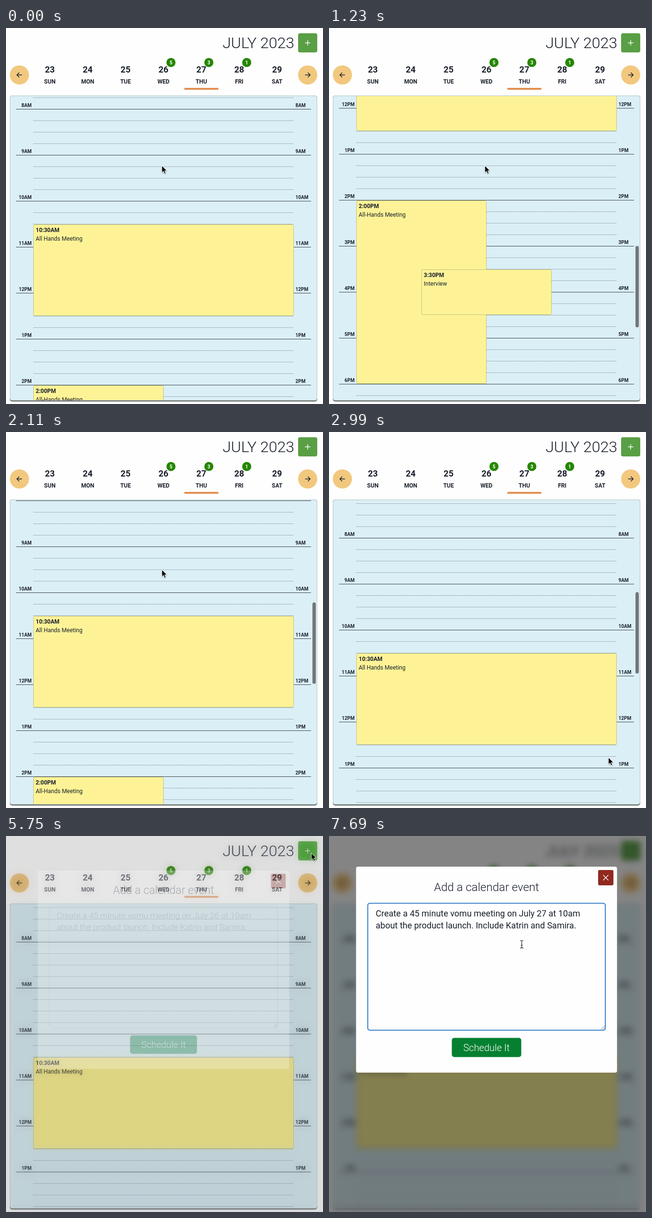
These frames come from a looping animation (662 px wide and 785 px high, 8000 ms). An HTML page:

```html
<!DOCTYPE html>
<html lang="en">
<head>
<meta charset="utf-8">
<title>Calendar</title>
<style>
  html, body { margin: 0; width: 100%; height: 100%; overflow: hidden; background: #fefefe; }
  svg, #shade { position: absolute; left: 0; top: 0; width: 662px; height: 785px; }
  #shade { background: rgba(0, 0, 0, .48); -webkit-backdrop-filter: blur(7px); backdrop-filter: blur(7px); }
  text { font-family: Roboto, Arial, sans-serif; fill: #1a202c; white-space: pre; }
  .bold { font-weight: 700; }
  .light { font-weight: 300; }
  .mid { text-anchor: middle; }
  .end { text-anchor: end; }
  .white { fill: #fff; }
  .icon { fill: none; stroke-width: 1.4; }
  #dialog { transform-origin: 329px 279px; }
</style>
</head>
<body>
<svg id="calendar" viewBox="0 0 662 785">
  <defs><clipPath id="view"><rect x="9" y="142" width="640" height="635" rx="4"/></clipPath></defs>
  <text class="light end" x="602" y="41.500" font-size="32">JULY 2023</text>
  <rect id="add" x="610" y="11" width="40" height="40" rx="4"/>
  <path class="icon" stroke="#fff" d="M630 25.5V36.5M624.5 31H635.5"/>
  <g id="week"></g>
  <rect x="372.500" y="125" width="71" height="4" fill="#e39052"/>
  <rect x="8" y="141" width="642" height="639" rx="5" fill="#777b7b"/>
  <rect x="8" y="141" width="642" height="636.500" rx="5" fill="#b0c6c6"/>
  <rect x="9" y="142" width="640" height="635" rx="4" fill="#dbeff6"/>
  <g clip-path="url(#view)">
    <g id="day"></g>
    <rect id="thumb" x="640" width="7" height="170" rx="3.500" fill="#737678"/>
  </g>
</svg>

<div id="shade"></div>

<svg viewBox="0 0 662 785">
  <g id="dialog">
    <rect x="56.500" y="64" width="545" height="430" rx="4" fill="#fefefe"/>
    <text class="light mid" x="329" y="114.500" font-size="24">Add a calendar event</text>
    <rect x="562" y="71" width="32" height="32" rx="3" fill="#90291f"/>
    <path class="icon" stroke="#fff" d="M572.500 81.500L583.500 92.500M583.500 81.500L572.500 92.500"/>
    <rect x="81.500" y="140.500" width="495" height="264.500" rx="5" fill="none" stroke="#cbd5e0"/>
    <rect id="ring" x="81" y="140.500" width="496" height="265" rx="4" fill="none" stroke="#3a82cb" stroke-width="2"/>
    <path d="M568 403.500L575.500 396M572 403.500L575.500 400" stroke="#666" stroke-width=".9"/>
    <g id="hint" class="light"></g>
    <g id="entry"></g>
    <rect id="caret" width="1" height="21" fill="#1a202c"/>
    <rect x="256.500" y="421.500" width="145" height="40" rx="5" fill="#058031"/>
    <text class="light mid white" x="329" y="448.500" font-size="20">Schedule It</text>
  </g>
  <g id="pointer">
    <path id="arrow" d="M.5 .5V15L3.900 11.900L6.300 17.300L8.800 16.200L6.500 11H11.100Z" fill="#000" stroke="#fff" stroke-width="1"
      style="filter: drop-shadow(0 1px 1px rgba(0,0,0,.35))"/>
    <path id="beam" class="icon" stroke="#222" style="stroke-width:1.200" d="M-3 -8Q0.500 -8 .5 -6Q.5 -8 4 -8M.5 -6V6M-3 8Q.5 8 .5 6Q.5 8 4 8M-1.500 2H2.500"/>
  </g>
</svg>

<script>
const $ = id => document.getElementById(id);
const LOOP = 8000, HOUR = 96, EIGHT = 169;

function add(parent, tag, attrs, content = '') {
  const el = document.createElementNS('http://www.w3.org/2000/svg', tag);
  for (const key in attrs) el.setAttribute(key, attrs[key]);
  el.textContent = content;
  parent.append(el);
  return el;
}
const label = (parent, x, y, size, cls, content) =>
  add(parent, 'text', { x, y, 'font-size': size, class: cls }, content);
const hourY = hour => EIGHT + (hour - 8) * HOUR;

function buildWeek() {
  const week = $('week');
  const badges = { WED: 5, THU: 3, FRI: 1 };
  'SUN MON TUE WED THU FRI SAT'.split(' ').forEach((name, i) => {
    const x = 91.5 + i * 79.1;
    label(week, x, 93.3, 18, 'bold mid', 23 + i);
    label(week, x, 116.2, 12, 'bold mid', name);
    if (!badges[name]) return;
    add(week, 'circle', { cx: x + 15.7, cy: 72, r: 9.5, fill: '#258600' });
    label(week, x + 15.7, 75.6, 10, 'bold mid white', badges[name]);
  });
  for (const [x, dir] of [[28, -1], [630, 1]]) {
    add(week, 'circle', { cx: x, cy: 98, r: 20, fill: '#f2c87f' });
    add(week, 'path', { class: 'icon', stroke: '#1a202c',
      d: `M${x - 5.3 * dir} 98H${x + 5 * dir}M${x + .3 * dir} 93L${x + 5.3 * dir} 98L${x + .3 * dir} 103` });
  }
}

function buildDay() {
  const day = $('day');
  for (let hour = 0; hour < 24; hour += .25) {
    const y = hourY(hour);
    if (hour % 1) {
      add(day, 'path', { d: `M57 ${y + .5}H601`, stroke: '#6f7a80', 'stroke-dasharray': '1 1' });
      continue;
    }
    const name = (hour % 12 || 12) + (hour < 12 ? 'AM' : 'PM');
    add(day, 'path', { d: `M21 ${y + .5}H637`, stroke: '#3d444b' });
    label(day, 53.5, y - 4.5, 10, 'bold end', name);
    label(day, 604.5, y - 4.5, 10, 'bold', name);
  }
}

function addEvent(start, hours, x, width, time, title) {
  const day = $('day'), y = hourY(start) + 1;
  const box = add(day, 'rect', { x: x + .5, y: y + .5, width: width - 1,
    height: hours * HOUR - 2, rx: 3, fill: '#fdf396', stroke: '#c5c283' });
  label(day, x + 5, y + 16, 12, 'bold', time);
  label(day, x + 5, y + 34, 12, '', title);
  return box;
}

function buildPrompt(group, date, color) {
  const lines = [`Create a 45 minute vomu meeting on July ${date} at 10am`,
    'about the product launch. Include Katrin and Samira.'];
  lines.forEach((line, i) => {
    label(group, 97.5, 167.5 + i * 25, 18, '', line).style.fill = color;
  });
}

buildWeek();
buildDay();
const firstEvent = addEvent(10.5, 2, 57, 544, '10:30AM', 'All Hands Meeting');
addEvent(14, 4, 57, 272, '2:00PM', 'All-Hands Meeting');
addEvent(15.5, 1, 193, 272, '3:30PM', 'Interview');
buildPrompt($('hint'), 26, '#8b939c');
buildPrompt($('entry'), 27, '#1a202c');

// Motion is sampled on an even tick, about 11.5 times a second.
const TICK = 86.7;
const toTick = t => 720 + Math.floor((t - 715) / TICK) * TICK;
const ramp = (t, start, end) => Math.min(1, Math.max(0, (t - start) / (end - start)));
const easeOut = p => 1 - (1 - p) ** 2;
const easeInOut = p => p < .5 ? 2 * p * p : 1 - 2 * (1 - p) ** 2;
const between = (t, start, end) => t >= start && t < end;

// A fling down, a fling back past the start, then a short drift.
const scrollAt = t => Math.round(554 * easeOut(ramp(t, 704, 1704))
  - 578 * easeInOut(ramp(t, 1715, 2210)) - 28 * easeOut(ramp(t, 2400, 2625)));

// Glides to x, y from start to end; equal times make a jump.
const glides = [
  [0, 0, 325, 287], [2870, 2970, 583, 679],
  [3600, 3600, 604, 738], [3980, 4180, 554, 679], [4220, 4620, 612, 775],
  [4700, 4700, 600, 640], [4750, 4880, 556, 151],
  [4990, 5450, 637, 35], [5880, 6280, 402, 226]
];
function pointerAt(t) {
  let x = 0, y = 0;
  for (const [start, end, toX, toY] of glides) {
    const p = start === end ? +(t >= start) : easeOut(ramp(t, start, end));
    x += (toX - x) * p;
    y += (toY - y) * p;
  }
  return [x, y];
}

function caretOn(t) {
  const since = t < 7160 ? 6360 : 7160;
  return t >= since && (t - since) % 1060 < 530;
}

const show = (id, on) => { $(id).style.display = on ? '' : 'none'; };
const move = (id, x, y) => $(id).setAttribute('transform', `translate(${x} ${y})`);

function draw(t) {
  const tick = toTick(t);
  const scroll = scrollAt(tick);
  const [x, y] = pointerAt(Math.max(0, tick));
  const open = easeInOut(ramp(tick, 5640, 5940));
  const hover = ramp(tick, 4740, 4870) - ramp(tick, 4990, 5140);
  const typed = t >= 7160;
  const overText = open > 0 && x > 81 && x < 577 && y > 140 && y < 405;

  move('day', 0, -scroll);
  $('thumb').setAttribute('y', 348.7 + scroll * .2755);
  $('thumb').style.opacity = t < 720 ? 0 : 1 - ramp(tick, 3175, 3490);
  firstEvent.style.fill = `color-mix(in srgb, #f9f2b8 ${hover * 100}%, #fdf396)`;
  $('add').style.fill = x > 610 && y < 51 ? '#57b343' : '#599f45';

  show('shade', open);
  $('shade').style.opacity = $('dialog').style.opacity = open;
  $('dialog').style.transform = `scale(${.95 + .05 * open})`;
  $('ring').style.opacity = ramp(tick, 6440, 6600);
  show('hint', !typed);
  show('entry', typed);
  move('caret', typed ? 516 : 98, typed ? 175.5 : 151);
  show('caret', caretOn(t));

  move('pointer', x, y);
  show('pointer', !between(t, 3520, 3870) && !between(t, 4640, 4790));
  show('arrow', !overText);
  show('beam', overText);
}

const begin = performance.now();
function play() {
  draw((performance.now() - begin) % LOOP);
  requestAnimationFrame(play);
}
play();
</script>
</body>
</html>
```
